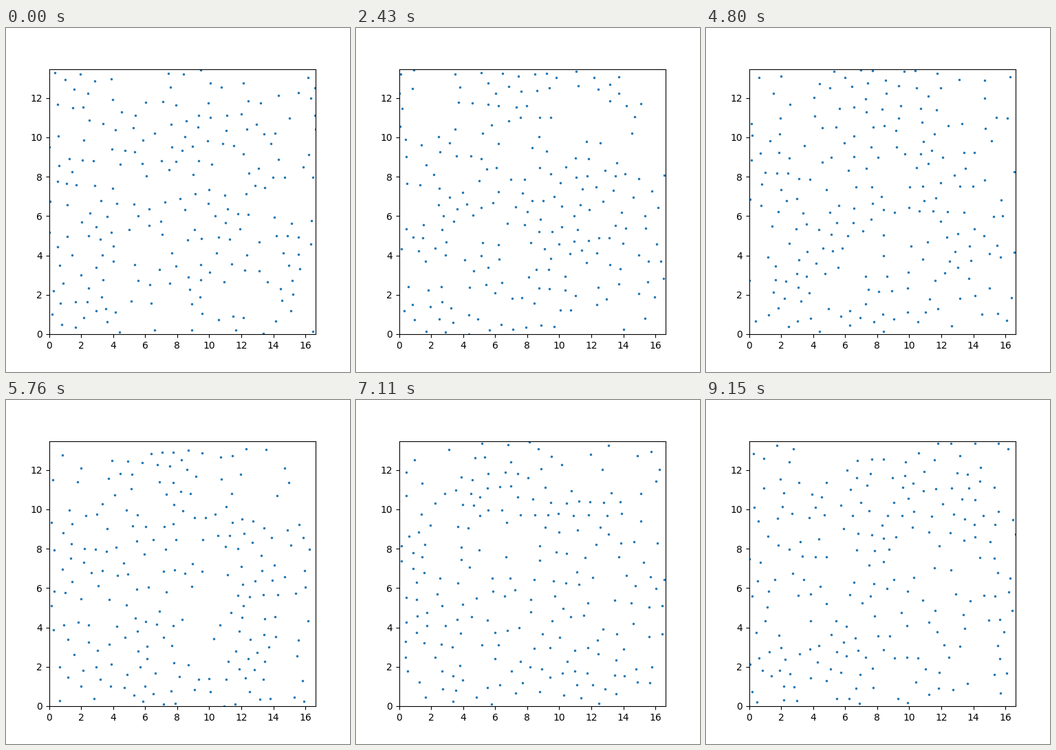
Animation, 500 px wide and 500 px high, one loop 9.18 s. Source, as a matplotlib script:

```python
import numpy as np
import matplotlib.pyplot as plt
from matplotlib.animation import FuncAnimation

# Periodic 2D Lennard-Jones gas
NX, NY = 15, 14
SPACING = 1.1094
SIGMA = 0.62
EPS = 0.55
TEMP = 0.8
DT = 0.012
SUBSTEPS = 3
WARMUP = 500
FRAMES = 306
INTERVAL = 30

ROW = SPACING * np.sqrt(3) / 2
LX, LY = NX * SPACING, NY * ROW
BOX = np.array([[LX], [LY]])
N = NX * NY


def lattice():
    i, j = np.meshgrid(np.arange(NX), np.arange(NY))
    x = (i + 0.5 * (j % 2) + 0.25) * SPACING
    y = (j + 0.5) * ROW
    return np.array([x.ravel(), y.ravel()])


def forces(pos):
    dx = pos[0][:, None] - pos[0]
    dy = pos[1][:, None] - pos[1]
    dx -= LX * np.rint(dx / LX)
    dy -= LY * np.rint(dy / LY)
    r2 = dx * dx + dy * dy
    np.fill_diagonal(r2, np.inf)
    inv = 1 / r2
    s2 = SIGMA**2 * inv
    s6 = s2 * s2 * s2
    f = 24 * EPS * inv * s6 * (2 * s6 - 1)
    return np.array([(f * dx).sum(1), (f * dy).sum(1)])


def step(pos, vel, acc):
    vel = vel + 0.5 * DT * acc
    pos = (pos + DT * vel) % BOX
    acc = forces(pos)
    return pos, vel + 0.5 * DT * acc, acc


def thermostat(vel):
    vel = vel - vel.mean(axis=1, keepdims=True)
    return vel * np.sqrt(2 * N * TEMP / (vel**2).sum())


def simulate():
    rng = np.random.default_rng(7)
    pos = lattice()
    vel = thermostat(rng.normal(size=(2, N)))
    acc = forces(pos)
    for k in range(WARMUP):
        pos, vel, acc = step(pos, vel, acc)
        if k % 10 == 0:
            vel = thermostat(vel)
    path = [pos]
    while len(path) < FRAMES:
        for _ in range(SUBSTEPS):
            pos, vel, acc = step(pos, vel, acc)
        path.append(pos)
    return path


path = simulate()

fig, ax = plt.subplots(figsize=(5, 5), dpi=100)
ax.set_xlim(0, LX)
ax.set_ylim(0, LY)
dots, = ax.plot(*path[0], "o", ms=1.5, color="#1f77b4")


def update(k):
    dots.set_data(*path[k])
    return dots,


anim = FuncAnimation(fig, update, frames=FRAMES, interval=INTERVAL,
                     repeat=True, repeat_delay=0)
plt.show()
```
